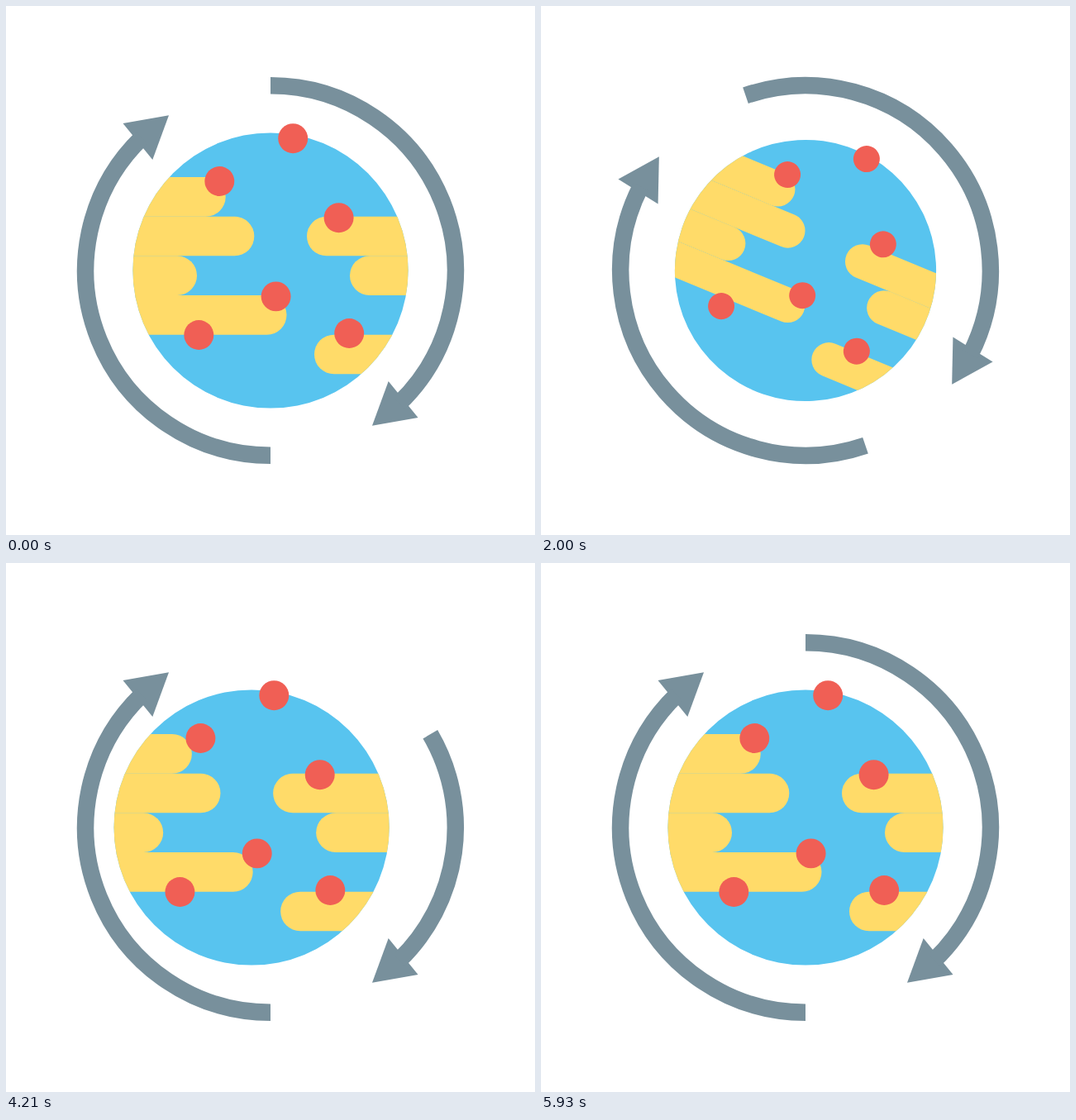
Animation of 640 by 640 pixels, one loop 6 s. Source, as an HTML page:

```html
<!DOCTYPE html>
<html lang="en">
<head>
<meta charset="utf-8">
<title>Globe</title>
<style>
  html, body { margin: 0; width: 100%; height: 100%; overflow: hidden; background: #fff; }
  svg { display: block; width: 100%; height: 100%; }
</style>
</head>
<body>
<svg viewBox="-320 -320 640 640">
  <defs>
    <clipPath id="disc"><circle r="166.6"/></clipPath>
  </defs>
  <g id="arrows" fill="#78909c" stroke="#78909c"></g>
  <g id="globe">
    <circle r="166.6" fill="#58c4ef"/>
    <g clip-path="url(#disc)"><g id="land" fill="#ffdb69"></g></g>
    <g id="dots" fill="#f05f55"></g>
  </g>
</svg>
<script>
const LOOP = 6000;
const RING = 223.8;
const BAND = 47.66;
const FAR = 400;
const $ = id => document.getElementById(id);

function add(parent, tag, attrs) {
  const node = document.createElementNS('http://www.w3.org/2000/svg', tag);
  for (const key in attrs) node.setAttribute(key, attrs[key]);
  return parent.appendChild(node);
}

// Each strip of land: row, rounded end, side it runs off to
const strips = [
  [0, -54.3, -1], [1, -19.7, -1], [2, -89, -1], [3, 19.5, -1],
  [1, 44, 1], [2, 96, 1], [4, 53, 1]
];
for (const [row, end, side] of strips) {
  add($('land'), 'rect', {
    x: side < 0 ? end - FAR : end, y: -113 + row * BAND,
    width: FAR, height: BAND + 0.05, rx: BAND / 2
  });
}

const dots = [
  [27.2, -159.8], [-61.7, -108], [82.6, -63.8], [6.6, 31.4], [-86.7, 78], [95.2, 76]
].map(([cx, cy]) => add($('dots'), 'circle', { cx, cy }));

const shafts = [0, 180].map(turn => {
  const arrow = add($('arrows'), 'g', { transform: `rotate(${turn})` });
  add(arrow, 'path', { d: 'M123 187.7L142.7 134L178.5 178Z', stroke: 'none' });
  return add(arrow, 'path', { fill: 'none', 'stroke-width': 20.5 });
});

const progress = (t, from, to) => Math.min(1, Math.max(0, (t - from) / (to - from)));
const easeInOut = p => p < 0.5 ? 2 * p * p : 1 - 2 * (1 - p) ** 2;
const smooth = p => (1 - Math.cos(Math.PI * p)) / 2;
const hump = (t, from, to) => Math.sin(Math.PI * progress(t, from, to)) ** 2;
const wave = (t, from, to) => Math.sin(2 * Math.PI * easeInOut(progress(t, from, to)));
const pulse = t => wave(t, 292, 2509);

function arc(fromDeg, toDeg) {
  const at = deg => {
    const a = deg * Math.PI / 180;
    return `${RING * Math.sin(a)} ${-RING * Math.cos(a)}`;
  };
  return `M${at(fromDeg)}A${RING} ${RING} 0 0 1 ${at(toDeg)}`;
}

function render(t) {
  const turn = 180 * easeInOut(progress(t, 292, 2509));
  $('arrows').setAttribute('transform', `rotate(${turn})`);
  shafts[0].setAttribute('d', arc(85 * hump(t, 4658, 5900), 136));
  shafts[1].setAttribute('d', arc(90 * hump(t, 3900, 4926), 136));

  const tilt = 20 * (smooth(progress(t, 400, 1900)) - smooth(progress(t, 1900, 2620)))
    - 15 * wave(t, 2643, 3838);
  const right = hump(t, 5000, 5930);
  const shift = 32 * (right - hump(t, 3900, 4870));
  const scale = 1 + 0.0833 * pulse(t);
  $('globe').setAttribute('transform', `translate(${shift}) rotate(${tilt}) scale(${scale})`);

  // Land and dots exaggerate the globe's motion, slightly behind it
  const late = pulse(t - 50);
  const landShift = 38 * (right - hump(t, 3960, 5000));
  $('land').setAttribute('transform',
    `translate(${landShift}) rotate(${0.18 * tilt}) scale(${1 + 0.106 * late})`);
  for (const dot of dots) dot.setAttribute('r', 17.95 * (1 + 0.087 * late));
}

const start = performance.now();
function tick() {
  render((performance.now() - start) % LOOP);
  requestAnimationFrame(tick);
}
tick();
</script>
</body>
</html>
```
